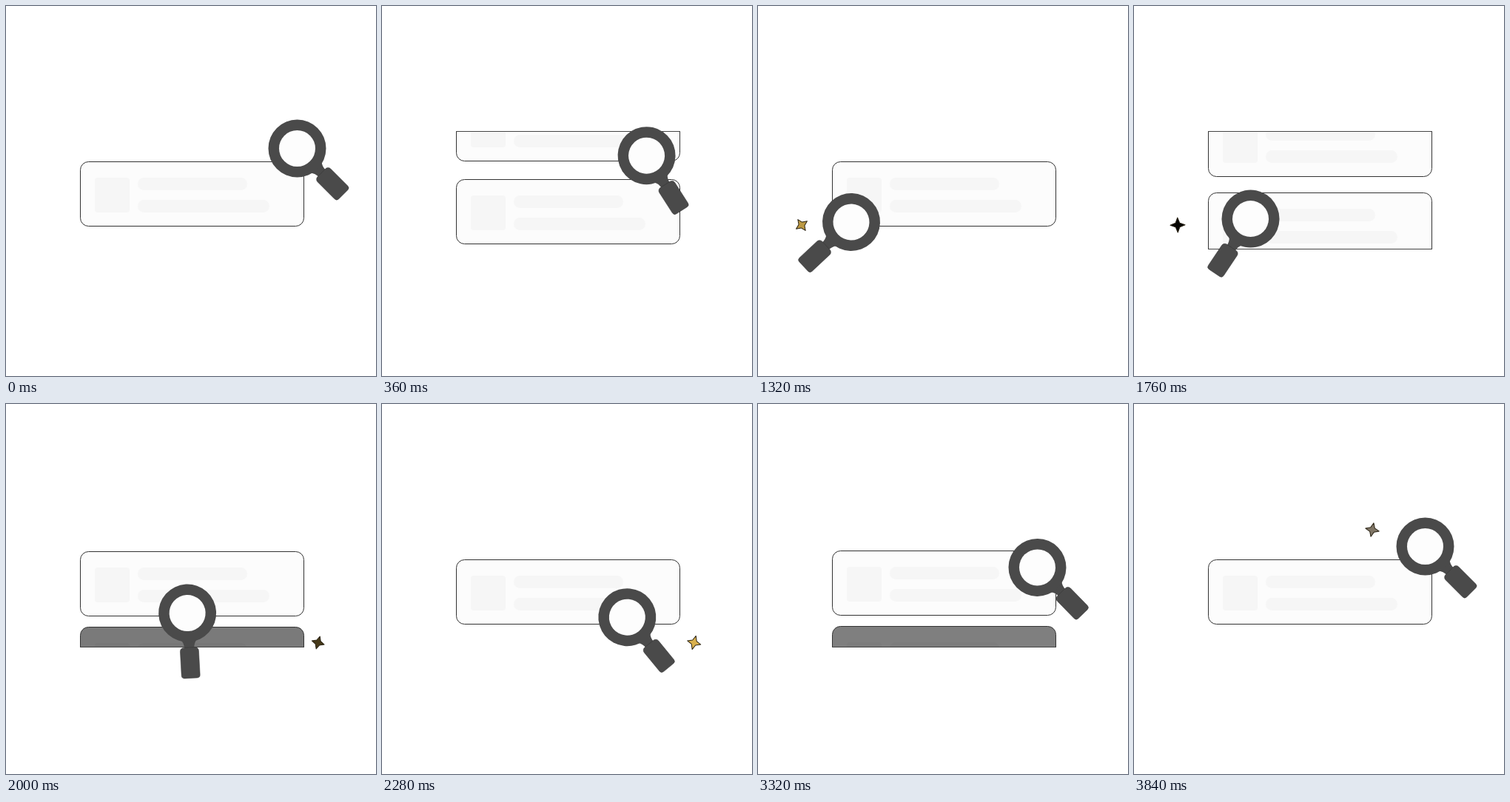
Animation of 500x500 px, one loop 3880 ms. Source, as an HTML page with a canvas:

```html
<!DOCTYPE html>
<html lang="en">
<head>
<meta charset="utf-8">
<title>Searching</title>
<style>
  html, body { margin: 0; width: 100%; height: 100%; overflow: hidden; background: #fff; }
  canvas { display: block; width: 500px; height: 500px; }
</style>
</head>
<body>
<canvas id="stage" width="500" height="500"></canvas>
<script>
const ctx = document.getElementById('stage').getContext('2d');
const LOOP = 3880, STEP = 40;

// The cards scroll inside this vertical window.
const VIEW = { top: 169, bottom: 329 };
const CARD = { x: 100, y: 210, w: 303, h: 88, above: 115, below: 100.6 };
const SCROLL = { starts: [149, 1465, 2790], length: 664 };

const STOPS = [
  { x: 393.5, y: 192.5, angle: 45 },
  { x: 126, y: 292, angle: 137 },
  { x: 339, y: 289.2, angle: 47.4 }
];
const MOVES = [
  { start: 176, length: 800, lift: 8 },
  { start: 1564, length: 808, lift: 8 },
  { start: 2812, length: 792, lift: 0 }
];

const SPARK_LIFE = 760;
const SPARKS = [
  { x: 59, y: 296, start: 1040, rgb: [224, 182, 80] },
  { x: 421.7, y: 322.5, start: 1856, rgb: [224, 182, 80] },
  { x: 322, y: 170, start: 3426, rgb: [131, 120, 104] }
];

const clamp = v => Math.max(0, Math.min(1, v));
const ease = v => { const u = clamp(v); return u * u * (3 - 2 * u); };
const mix = (a, b, f) => a + (b - a) * f;
const shade = (rgb, level) => `rgb(${rgb.map(c => Math.round(c * level)).join(',')})`;
const grey = (value, level) => shade([value, value, value], level);

function roundRect(x, y, w, h, r, fill) {
  ctx.beginPath();
  ctx.roundRect(x, y, w, h, r);
  ctx.fillStyle = fill;
  ctx.fill();
}

function edge(y) {
  ctx.fillStyle = '#444';
  ctx.fillRect(CARD.x, y, CARD.w, 1);
}

// A fading card darkens towards black.
function drawCard(offset, level) {
  const y = Math.round(CARD.y + offset);
  ctx.save();
  ctx.beginPath();
  ctx.rect(0, VIEW.top, 500, VIEW.bottom - VIEW.top);
  ctx.clip();
  roundRect(CARD.x + 0.5, y + 0.5, CARD.w - 1, CARD.h - 1, 11, grey(252, level));
  ctx.strokeStyle = '#333';
  ctx.lineWidth = 1;
  ctx.stroke();
  const block = grey(246, level);
  roundRect(120, y + 22, 47, 47, 4, block);
  roundRect(178, y + 22, 148, 17, 8.5, block);
  roundRect(178, y + 52, 178, 17, 8.5, block);
  ctx.restore();
  if (y < VIEW.top && y + CARD.h > VIEW.top) edge(VIEW.top);
  if (y < VIEW.bottom && y + CARD.h > VIEW.bottom) edge(VIEW.bottom - 1);
}

function drawCards(time) {
  const start = SCROLL.starts.find(s => time >= s && time < s + SCROLL.length);
  if (start === undefined) return drawCard(0, 1);
  const u = (time - start) / SCROLL.length;
  const f = ease(u);
  drawCard(-CARD.above * (1 - f), clamp(u / 0.15));
  drawCard(CARD.below * f, clamp((1 - u) / 0.4));
}

function lensPose(time) {
  let i = 0;
  while (i < 2 && time >= MOVES[i + 1].start) i++;
  const move = MOVES[i], from = STOPS[i], to = STOPS[(i + 1) % 3];
  const f = ease((time - move.start) / move.length);
  return {
    x: mix(from.x, to.x, f),
    y: mix(from.y, to.y, f) - move.lift * 4 * f * (1 - f),
    angle: mix(from.angle, to.angle, f)
  };
}

function drawLens({ x, y, angle }) {
  ctx.save();
  ctx.translate(x, y);
  ctx.rotate(angle * Math.PI / 180);

  ctx.fillStyle = '#4a4a4a';
  ctx.beginPath();
  ctx.moveTo(36, -11);
  ctx.quadraticCurveTo(40, -6.5, 49, -6.5);
  ctx.lineTo(49, 6.5);
  ctx.quadraticCurveTo(40, 6.5, 36, 11);
  ctx.fill();
  roundRect(46.5, -12.5, 41.5, 25, [5, 4, 4, 5], '#4a4a4a');
  ctx.strokeStyle = '#333';
  ctx.lineWidth = 0.5;
  ctx.stroke();

  ctx.beginPath();
  ctx.arc(0, 0, 39, 0, 2 * Math.PI);
  ctx.fill();
  ctx.beginPath();
  ctx.arc(0, 0, 24.5, 0, 2 * Math.PI);
  ctx.fillStyle = '#fdfdfd';
  ctx.fill();
  ctx.restore();
}

function drawSpark({ x, y, start, rgb }, time) {
  const u = (time - start) / SPARK_LIFE;
  if (u <= 0 || u >= 1) return;
  const size = mix(8.6, 10, ease(u));
  ctx.save();
  ctx.translate(x, y);
  ctx.rotate(Math.PI * ease(u));
  ctx.beginPath();
  for (let i = 0; i < 8; i++) {
    const r = i % 2 ? 4 : size, a = i * Math.PI / 4;
    ctx.lineTo(r * Math.cos(a), r * Math.sin(a));
  }
  ctx.closePath();
  ctx.fillStyle = shade(rgb, Math.sin(Math.PI * u) ** 2);
  ctx.fill();
  ctx.strokeStyle = '#2a2314';
  ctx.lineWidth = 1;
  ctx.lineJoin = 'round';
  ctx.stroke();
  ctx.restore();
}

function draw() {
  const time = Math.floor(performance.now() % LOOP / STEP) * STEP;
  ctx.fillStyle = '#fff';
  ctx.fillRect(0, 0, 500, 500);
  drawCards(time);
  SPARKS.forEach(spark => drawSpark(spark, time));
  drawLens(lensPose(time));
  requestAnimationFrame(draw);
}
draw();
</script>
</body>
</html>
```
